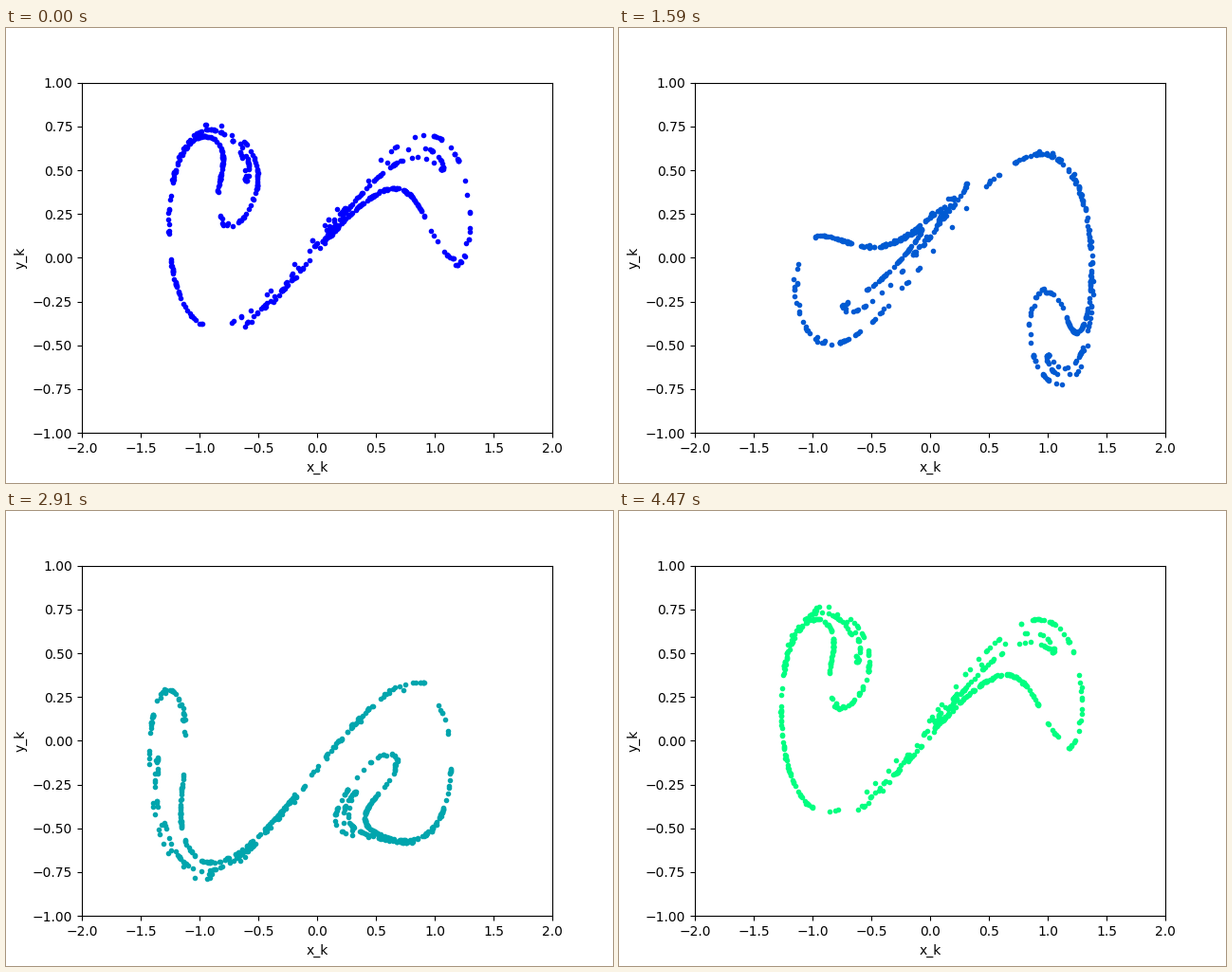
Animation, 640 px wide and 480 px high, one loop 4500 ms. Source, as a matplotlib script:

```python
import numpy as np
import matplotlib.pyplot as plt
from matplotlib.animation import FuncAnimation

# Forced Duffing oscillator: x'' + DELTA x' - x + x^3 = GAMMA cos(OMEGA t)
DELTA, GAMMA, OMEGA = 0.3, 0.31, 1.2
FRAMES, INTERVAL = 150, 30
POINTS, SETTLE = 600, 12
STEP = 2 * np.pi / OMEGA / FRAMES


def flow(state, t):
    x, y = state
    return np.array([y, x - x**3 - DELTA * y + GAMMA * np.cos(OMEGA * t)])


def advance(state, t):
    """One Runge-Kutta step of length STEP."""
    k1 = flow(state, t)
    k2 = flow(state + STEP / 2 * k1, t + STEP / 2)
    k3 = flow(state + STEP / 2 * k2, t + STEP / 2)
    k4 = flow(state + STEP * k3, t + STEP)
    return state + STEP / 6 * (k1 + 2 * k2 + 2 * k3 + k4)


def poincare_sections():
    """The settled cloud of points at every phase of one driving period."""
    rng = np.random.default_rng(4)
    state = np.array([rng.uniform(-1.3, 1.3, POINTS),
                      rng.uniform(-0.5, 0.8, POINTS)])
    for i in range(SETTLE * FRAMES):
        state = advance(state, i % FRAMES * STEP)
    sections = []
    for i in range(FRAMES):
        sections.append(state)
        state = advance(state, i * STEP)
    return sections


sections = poincare_sections()

fig, ax = plt.subplots(figsize=(6.4, 4.8), dpi=100)
ax.set_xlim(-2, 2)
ax.set_ylim(-1, 1)
ax.set_xlabel("x_k")
ax.set_ylabel("y_k")
dots, = ax.plot([], [], ".")


def draw(i):
    dots.set_data(*sections[i])
    dots.set_color(plt.cm.winter(i / FRAMES))
    return dots,


anim = FuncAnimation(fig, draw, frames=FRAMES, interval=INTERVAL,
                     repeat=True, repeat_delay=0)
plt.show()
```
